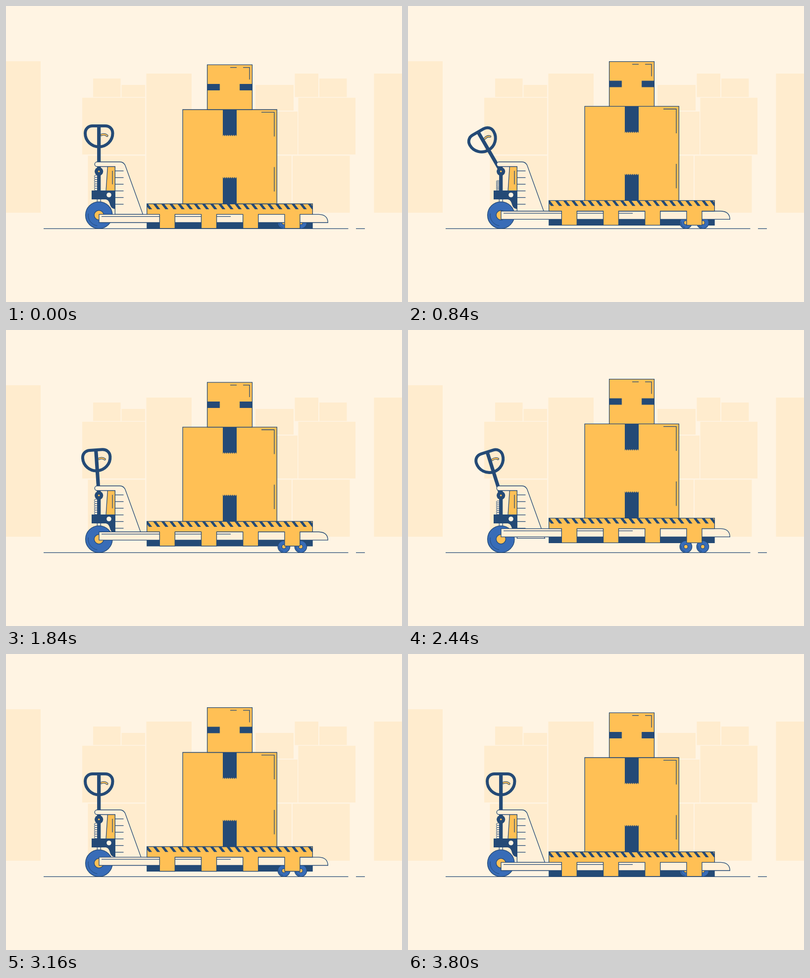
Recreate the animation shown at these times as an HTML page with a canvas. Size 800x600 px, loop 3.84 s.

```html
<!DOCTYPE html>
<html lang="en">
<head>
<meta charset="utf-8">
<title>Pallet truck</title>
<style>
  html, body { margin: 0; width: 100%; height: 100%; overflow: hidden; background: #fff4e3; }
  canvas { display: block; }
</style>
</head>
<body>
<canvas id="stage" width="800" height="600"></canvas>
<script>
const ctx = document.getElementById('stage').getContext('2d');
const NAVY = '#244a76', BLUE = '#386cb7', YELLOW = '#ffc055';
const PAPER = '#fff4e3', SHADE = '#ffecce', CREAM = '#fff0d9';
const LOOP = 3840, STEP = 40;
const PUMP_START = 480, PUMP = 720, PUMPS = 3;
const LOWER_START = 2580, LOWER_END = 3800;
const LIFT = 19.6, TILT = Math.PI / 6;
const PIVOT = { x: 187.7, y: 335.3 };

const clamp = v => Math.min(1, Math.max(0, v));
const ease = v => { v = clamp(v); return v * v * (3 - 2 * v); };

// Every downstroke raises the load by a third; the upstroke leaves it there.
function pose(t) {
  let press = 0, raised = 0;
  for (let i = 0; i < PUMPS; i++) {
    const local = (t - PUMP_START - i * PUMP) / (PUMP / 2);
    const down = ease(local);
    press += down - ease(local - 1);
    raised += down / PUMPS;
  }
  raised *= 1 - ease((t - LOWER_START) / (LOWER_END - LOWER_START));
  return { press, lift: raised * LIFT };
}

function paint(path, fill, stroke = NAVY, width = 1.3) {
  if (typeof path === 'string') path = new Path2D(path);
  if (fill) { ctx.fillStyle = fill; ctx.fill(path); }
  if (stroke) { ctx.strokeStyle = stroke; ctx.lineWidth = width; ctx.stroke(path); }
}

function box(x, y, right, bottom, fill, stroke) {
  const path = new Path2D();
  path.rect(x, y, right - x, bottom - y);
  paint(path, fill, stroke);
}

function disc(x, y, r, fill, stroke) {
  const path = new Path2D();
  path.arc(x, y, r, 0, 7);
  paint(path, fill, stroke);
}

const line = d => paint(d, null);

const backdrop = [
  [0, 112, 70, 419], [176, 147, 231.5, 184.5], [233.5, 160, 281, 184.5],
  [154, 186, 281, 301], [165.5, 303.5, 281, 419], [283.5, 137, 375, 419],
  [504, 160, 581, 212], [583.5, 137, 631, 184.5], [633, 147, 688.5, 184.5],
  [590.5, 186, 706, 301], [579, 303.5, 694.5, 419], [504, 214, 589, 301],
  [462, 303.5, 577, 419], [743.5, 137, 800, 419]
];

function drawBackdrop() {
  ctx.fillStyle = PAPER;
  ctx.fillRect(0, 0, 800, 600);
  backdrop.forEach(b => box(...b, SHADE, null));
  line('M76 451.3H691.5M707 451.3H725');
}

function wheel(x, y, r, hub) {
  disc(x, y, r, BLUE, NAVY);
  disc(x, y, hub, YELLOW, NAVY);
  const shine = new Path2D();
  shine.arc(x, y, r * 0.8, Math.PI * 0.55, Math.PI * 1.05);
  paint(shine, null, NAVY, 1);
}

function drawHandle(press) {
  ctx.save();
  ctx.translate(PIVOT.x, PIVOT.y);
  ctx.rotate(-press * TILT);
  ctx.translate(-PIVOT.x, -PIVOT.y);
  paint('M187.7 243V335', null, NAVY, 7.2);
  paint('M175 243H200.5C209 243 215.5 249 215.5 258C215.5 273 203 285.3 187.7 285.3' +
        'C172.5 285.3 160 273 160 258C160 249 166.500 243 175 243Z', null, NAVY, 6);
  ctx.lineCap = 'round';
  const lever = 'M192.500 261.300Q199.500 258.500 204.300 263';
  paint(lever, null, NAVY, 4.600);
  paint(lever, null, YELLOW, 2.400);
  ctx.restore();
}

function drawSpring(press) {
  const top = 343 + 11 * press * press, coils = 7, pitch = (374 - top) / coils;
  for (let i = 0; i < coils; i++) {
    const coil = new Path2D();
    coil.ellipse(182, top + pitch * (i + 0.5), 3.6, pitch * 0.55, 0, 0, 7);
    paint(coil, CREAM, NAVY, 1);
  }
}

function drawTruck(press) {
  drawHandle(press);
  drawSpring(press);
  paint('M187.7 326V375', null, NAVY, 7.2);
  paint('M184 316H230Q238.500 316 241.500 325L276.500 422.300H220.300V325.500H184' +
        'A4.750 4.750 0 0 1 184 316Z', CREAM);
  for (let i = 0; i < 6; i++) line(`M220 ${334.3 + 13.5 * i}h17.5`);
  paint('M205.300 325.700H220.300V375H202Z', YELLOW);
  line('M215 334V361.500');
  disc(PIVOT.x, PIVOT.y, 8.6, NAVY, null);
  disc(PIVOT.x, PIVOT.y, 1.8, YELLOW, null);
  box(184.3, 391, 191.3, 399, CREAM, NAVY);
  paint('M173 374H220.500V411.500C213 411 211 406 209.500 400.500' +
        'C207.500 394 204.500 392 200 392H173Z', NAVY, null);
  disc(208, 383, 4.8, PAPER, null);
  wheel(187.8, 424, 27.2, 9.6);
}

// A strip of tape whose torn end runs along (dx, dy) with small teeth.
function tape(x, y, length, width, angle, teeth, depth) {
  ctx.save();
  ctx.translate(x, y);
  ctx.rotate(angle);
  const path = new Path2D();
  path.moveTo(0, 0);
  path.lineTo(length, 0);
  for (let i = 0; i < teeth; i++) {
    path.lineTo(length - depth, (i + 0.5) * width / teeth);
    path.lineTo(length, (i + 1) * width / teeth);
  }
  path.lineTo(0, width);
  paint(path, NAVY, null);
  ctx.restore();
}

function drawBoxes() {
  box(357, 210, 547.3, 401, YELLOW, NAVY);
  tape(466, 210, 54, 28, Math.PI / 2, 7, 3);
  tape(438, 401, 54.5, 28, -Math.PI / 2, 7, 3);
  line('M516 215.300H542V264.500M542 326.500V376');

  box(406.6, 119.2, 497.4, 210, YELLOW, NAVY);
  tape(407, 158, 25.5, 13, 0, 6, 1.2);
  tape(497, 171, 25.5, 13, Math.PI, 6, 1.2);
  line('M453 124.700H466M479 124.700H492V149');
}

function drawPallet() {
  let outline = 'M284.700 401H619.300V422.300H594';
  for (let i = 3; i >= 0; i--) {
    const x = 310.3 + 84.2 * i;
    outline += `H${x + 31}V451H${x}V422.3`;
  }
  paint(outline + 'H284.700Z', YELLOW, null);

  ctx.save();
  ctx.beginPath();
  ctx.rect(284.7, 401, 334.6, 11);
  ctx.clip();
  for (let i = 0; i < 21; i++) {
    paint(`M${280.5 + 16.45 * i} 401h6.2l8.5 11h-6.2Z`, NAVY, null);
  }
  ctx.restore();
  paint(outline + 'H284.700Z', null);
}

function drawLoad(lift) {
  const raised = draw => {
    ctx.save();
    ctx.translate(0, -lift);
    draw();
    ctx.restore();
  };
  raised(() => box(284.2, 438.5, 619.7, 451.6, NAVY, null));
  wheel(561.4, 439.2, 12.2, 4);
  wheel(595.4, 439.2, 12.2, 4);
  raised(() => {
    paint('M188 422.300H632Q650 423 650.300 439H188Z', CREAM);
    line('M193 426.700H454');
    drawPallet();
    drawBoxes();
  });
}

function frame() {
  const t = Math.floor((performance.now() % LOOP) / STEP) * STEP;
  const { press, lift } = pose(t);
  drawBackdrop();
  drawTruck(press);
  drawLoad(lift);
  requestAnimationFrame(frame);
}
frame();
</script>
</body>
</html>
```
